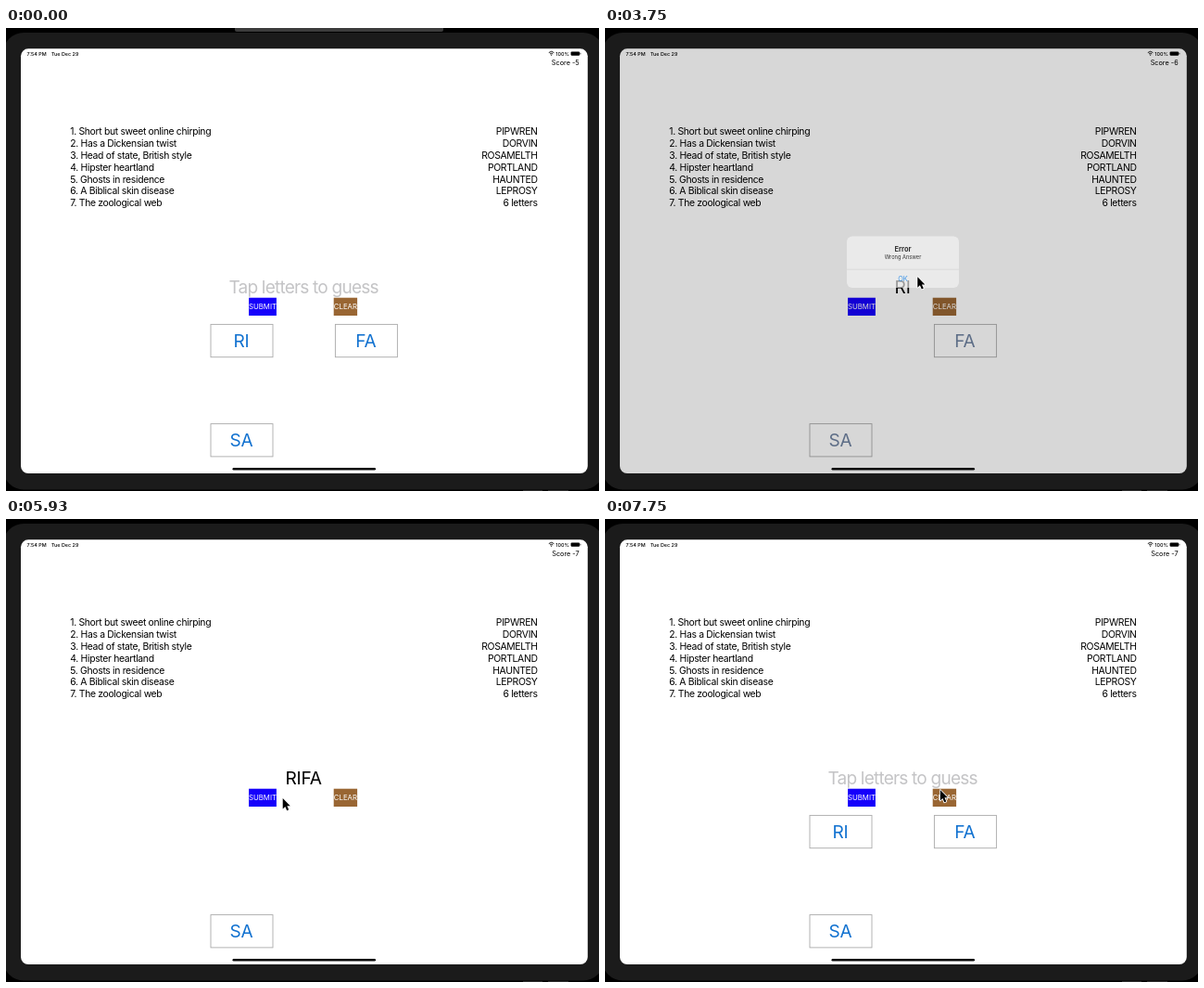
Animation, 640 px wide and 499 px high, one loop 8 s. Source, as an HTML page:

```html
<!DOCTYPE html>
<html lang="en">
<head>
<meta charset="utf-8">
<title>Word game</title>
<style>
  html, body { margin: 0; width: 100%; height: 100%; overflow: hidden; background: #000; }
  svg { display: block; width: 100%; height: 100%; }
  text { font-family: Inter, Roboto, sans-serif; }
  .list text { font-size: 10.4px; letter-spacing: -.032em; }
  .big { font-size: 19.1px; letter-spacing: -.01em; }
  .hint { letter-spacing: -.043em; }
  .mid { text-anchor: middle; }
  .end { text-anchor: end; }
  .status { font-size: 5.4px; font-weight: 500; }
  .cap { font-size: 7.8px; fill: #fff; text-anchor: middle; }
  .tile rect { fill: none; stroke: #aaa; stroke-width: .9; }
</style>
</head>
<body>
<svg viewBox="0 0 640 499">
  <rect width="640" height="499"/>
  <rect id="strip" x="247" y="-4" width="225" height="8" rx="2" fill="#3c3c3c"/>
  <path d="M558 498.5h21M585 498.5h22" stroke="#2c2c2c"/>
  <rect x="-3" y="5" width="648" height="492.5" rx="22" fill="#1b1b1b"/>
  <rect x="16" y="22.3" width="611.8" height="457.7" rx="8" fill="#fff"/>

  <g class="status">
    <text x="22.5" y="29.5">7:54 PM</text>
    <text x="49" y="29.5">Tue Dec 29</text>
    <text x="607.8" y="29.5" class="end">100%</text>
    <path d="M585.8 26.6a4 4 0 0 1 5.6 0M587 28a2.3 2.3 0 0 1 3.2 0" fill="none" stroke="#000" stroke-width=".9"/>
    <circle cx="588.6" cy="29.1" r=".7"/>
    <rect x="609.6" y="25.4" width="9.6" height="4.4" rx="1.2"/>
    <rect x="619.6" y="26.8" width=".7" height="1.6" rx=".3"/>
  </g>
  <text id="score" x="618.7" y="40" class="end" font-size="7.3"></text>

  <g id="clues" class="list"></g>
  <g id="answers" class="list end"></g>

  <text id="guess" class="big mid" x="321.1" y="285.5"></text>
  <rect x="262.1" y="290.7" width="29.8" height="19.3" fill="#1500fb"/>
  <text id="submit" class="cap" x="277" y="303.2">SUBMIT</text>
  <rect x="353.7" y="290.7" width="25.4" height="19.3" fill="#996633"/>
  <text id="clear" class="cap" x="366.4" y="303.2">CLEAR</text>
  <g id="tiles" class="big mid"></g>

  <rect id="dim" x="16" y="22.3" width="611.8" height="457.7" rx="8"/>
  <rect x="244.5" y="474.1" width="154.5" height="2.4" rx="1.2"/>

  <g id="alert" class="mid">
    <rect id="panel" x="-60.5" y="-27.8" width="121" height="55.6" rx="6"/>
    <path id="press" d="M-60.5 7.9h121v13.9a6 6 0 0 1-6 6h-109a6 6 0 0 1-6-6z" fill-opacity=".09"/>
    <g id="words">
      <path d="M-60.5 7.9h121" stroke="#000" stroke-opacity=".18" stroke-width=".5"/>
      <text y="-11.7" font-size="7.4" font-weight="700">Error</text>
      <text y="-3" font-size="5.7">Wrong Answer</text>
      <text y="20.5" font-size="7.4" fill="#1580e8">OK</text>
    </g>
  </g>

  <path id="cursor" d="M.3.6V12L2.9 9.6 4.8 13.8 6.8 12.9 4.9 8.8H8.4Z" stroke="#fff" stroke-width="1.7" stroke-linejoin="round" paint-order="stroke"/>
</svg>
<script>
const LOOP = 8000, STEP = 50, RATE = 12.4;
const $ = id => document.getElementById(id);
const NS = 'http://www.w3.org/2000/svg';

function add(parent, tag, attrs, text = '') {
  const el = document.createElementNS(NS, tag);
  for (const k in attrs) el.setAttribute(k, attrs[k]);
  el.textContent = text;
  return parent.appendChild(el);
}

function column(id, x, lines) {
  lines.forEach((line, i) => add($(id), 'text', { x, y: 115.4 + i * 12.78 }, line));
}

column('clues', 69.3, [
  '1. Short but sweet online chirping', '2. Has a Dickensian twist',
  '3. Head of state, British style', '4. Hipster heartland',
  '5. Ghosts in residence', '6. A Biblical skin disease', '7. The zoological web'
]);
column('answers', 573.6, [
  'PIPWREN', 'DORVIN', 'ROSAMELTH', 'PORTLAND', 'HAUNTED', 'LEPROSY', '6 letters'
]);

function tile(label, x, y) {
  const g = add($('tiles'), 'g', { class: 'tile' });
  add(g, 'rect', { x, y, width: 67, height: 35.3 });
  const text = add(g, 'text', { x: x + 33, y: y + 24.5 }, label);
  return { g, text };
}
const ri = tile('RI', 221, 319.4), fa = tile('FA', 355.4, 319.4);
tile('SA', 221, 426.6);

// Pointer path: time, x, y
const path = [
  [100, 338, 445], [300, 338, 445], [400, 324, 397], [500, 324, 397],
  [850, 255.5, 334.5], [1400, 255.5, 334.5], [1950, 268, 305],
  [2350, 268, 305], [3000, 337, 268], [4350, 337, 267.5], [4850, 378, 331],
  [5250, 378, 331], [5700, 276, 302], [5850, 280, 302], [6000, 351, 296],
  [6100, 354, 295], [6550, 331, 269], [6900, 331, 269], [7200, 361.5, 291.5]
];

const mix = (a, b, k) => a + (b - a) * k;

function pointer(t) {
  let i = 0;
  while (i < path.length - 1 && path[i + 1][0] <= t) i++;
  const a = path[i], b = path[i + 1] || a;
  const u = b === a ? 0 : Math.max(0, (t - a[0]) / (b[0] - a[0]));
  const k = u * u * (3 - 2 * u);
  return [mix(a[1], b[1], k), mix(a[2], b[2], k)];
}

const alerts = [
  { show: 2250, start: 2178, press: 3450, hide: 3750 },
  { show: 5950, start: 5928, press: 6700, hide: 6850 }
];
const decay = ms => Math.exp(-RATE * ms / 1000);

// Alert progress 0..1, easing in and out exponentially
function alertState(t) {
  for (const a of alerts) {
    if (t < a.show || t > a.hide + 450) continue;
    const closing = t >= a.hide;
    return {
      p: closing ? decay(t - a.hide + 20) : 1 - decay(t - a.start),
      closing,
      pressed: t >= a.press && !closing
    };
  }
  return { p: 0, closing: false, pressed: false };
}

const within = (t, a, b) => t >= a && t < b;
const show = (el, on) => el.setAttribute('visibility', on ? 'visible' : 'hidden');
const set = (el, name, value) => el.setAttribute(name, value);

function draw(t) {
  set($('strip'), 'opacity', Math.min(1, Math.max(0, (800 - t) / 300)));
  $('score').textContent = 'Score ' + (t < 2050 ? -5 : t < 5750 ? -6 : -7);

  const empty = t < 1050 || t >= 7300;
  $('guess').textContent = empty ? 'Tap letters to guess' : t < 5150 ? 'RI' : 'RIFA';
  set($('guess'), 'class', empty ? 'big mid hint' : 'big mid');
  set($('guess'), 'fill', empty ? '#c4c4c6' : '#000');
  show(ri.g, empty);
  show(fa.g, t < 5150 || t >= 7300);
  set(ri.text, 'opacity', within(t, 1000, 1050) ? .3 : 1);
  set(fa.text, 'opacity', within(t, 5100, 5150) ? .3 : 1);
  set($('submit'), 'opacity', within(t, 2000, 2050) || within(t, 5700, 5750) ? .3 : 1);
  set($('clear'), 'opacity', within(t, 7250, 7300) ? .3 : 1);

  const { p, closing, pressed } = alertState(t);
  const tint = `rgb(${mix(18, 137, p)},${mix(114, 135, p)},${mix(208, 146, p)})`;
  set($('tiles'), 'fill', tint);
  set($('dim'), 'opacity', p * .2);

  const scale = closing ? 1 : 1 + .19 * (1 - p);
  const solid = p ** 8, grey = 249 - 11 * solid;
  show($('alert'), p > 0);
  set($('alert'), 'transform', `translate(321.5 252.3) scale(${scale})`);
  set($('panel'), 'fill', `rgb(${grey},${grey},${grey})`);
  set($('panel'), 'opacity', .76 * p + .19 * solid);
  set($('words'), 'opacity', p);
  show($('press'), pressed);

  const [x, y] = pointer(t);
  show($('cursor'), t >= 100);
  set($('cursor'), 'transform', `translate(${x} ${y})`);
}

const begin = performance.now();
function frame() {
  const t = (performance.now() - begin) % LOOP;
  draw(Math.floor(t / STEP) * STEP);
  requestAnimationFrame(frame);
}
draw(0);
requestAnimationFrame(frame);
</script>
</body>
</html>
```
